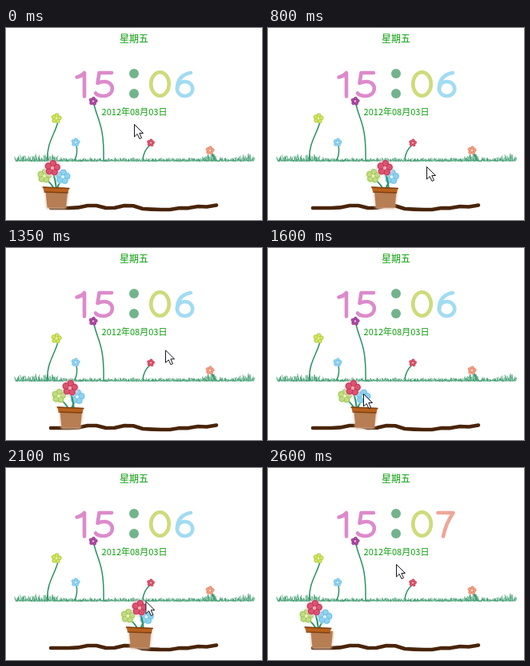
Write an HTML page that moves like this. It is 320 px wide and 240 px high and loops after 2.75 s.

```html
<!DOCTYPE html>
<html lang="zh">
<head>
<meta charset="utf-8">
<style>
html, body { margin: 0; width: 100%; height: 100%; overflow: hidden; background: #fff; }
svg { display: block; width: 100vw; height: 100vh; }
text { font-family: "Noto Sans CJK SC", "Noto Sans CJK", sans-serif; fill: #0a9e0a; text-anchor: middle; }
.line { fill: none; stroke-linecap: round; stroke-linejoin: round; }
</style>
</head>
<body>
<svg viewBox="0 0 320 240">
  <defs>
    <filter id="soft" x="-50%" y="-50%" width="200%" height="200%"><feGaussianBlur stdDeviation="1.6"/></filter>
  </defs>
  <rect width="320" height="240" fill="#fff"/>
  <text x="160" y="18" font-size="12">星期五</text>
  <text x="160.5" y="108.5" font-size="11">2012年08月03日</text>

  <g class="line" stroke-width="4.6">
    <path stroke="#dc8acb" d="M88.5 61.5Q95 60 98 56V85.5"/>
    <path stroke="#dc8acb" d="M132 56H116.5L114.5 69Q119 67 123 67C136.5 67 136 85 122 85Q115 85 112 81.5"/>
    <ellipse stroke="#cedb7b" cx="192.5" cy="70" rx="11.3" ry="14.8"/>
    <g id="six" stroke="#a1dcf2"><path d="M231 56Q214 59 214 76"/><ellipse cx="223.6" cy="76" rx="9.7" ry="9"/></g>
    <path id="seven" stroke="#eda798" d="M212.5 56H231.5Q222 70 219 85.5"/>
  </g>
  <g fill="#73b38c"><circle cx="160" cy="57" r="6"/><circle cx="160" cy="82" r="6"/></g>

  <g class="line" stroke="#2c9160">
    <path id="grass" stroke-width=".7"/>
    <g stroke-width="1.5">
      <path d="M65 117C62 131 50 145 52 165"/>
      <path d="M88 147Q90 156 86 165"/>
      <path d="M110 95C114 115 123 120 122 165"/>
      <path d="M180 146Q172 154 171 164"/>
      <path d="M256 156Q260 160 260 165"/>
    </g>
  </g>
  <g id="meadow"></g>
  <path id="soil" class="line" stroke="#492409" stroke-width="4.6"/>

  <g id="pot">
    <g id="sides" class="line" stroke="#2c9160" stroke-width="2">
      <path d="M-13 189Q-6 193-2 201M9 190Q3 195 2 201"/>
    </g>
    <g id="top">
      <path class="line" stroke="#2c9160" stroke-width="2" d="M-3 181Q0 191 1 201"/>
    </g>
    <g id="body">
      <path d="M-13 204H16L13 226H-11Z" fill="#d9b79c" filter="url(#soft)"/>
      <path d="M-12.5 204H15L13 224.5H-10.5Z" fill="#b77d53"/>
    </g>
    <path d="M-16 198.5L17 200L15.5 206L-14.5 204.5Z" fill="#b9621d"/>
    <path class="line" d="M-16 199L17 200.5M-14 205L15 206" stroke="#80400f" stroke-width="1.3"/>
  </g>
  <path id="cursor" d="M.5.5V16L4.2 12.5L7 18.5L9.5 17.3L6.8 11.5H11.5Z" fill="#fff" stroke="#15151f"/>
</svg>
<script>
const $ = id => document.getElementById(id);
const LOOP = 2750, STEP = 50;

let seed = 17;
function rnd() {
  seed = (seed * 16807) % 2147483647;
  return seed / 2147483647;
}

function flower(x, y, r, petal, edge, heart) {
  let s = "";
  for (let i = 0; i < 5; i++) {
    const a = 0.15 + (i * 0.4 - 0.5) * Math.PI;
    const px = x + r * 0.62 * Math.cos(a), py = y + r * 0.62 * Math.sin(a);
    s += `<circle cx="${px}" cy="${py}" r="${r * 0.4}" fill="${petal}" stroke="${edge}" stroke-width="${r * 0.13}"/>`;
  }
  return s + `<circle cx="${x}" cy="${y}" r="${r * 0.24}" fill="${heart}" stroke="none"/>`;
}

function glowing(x, y, r, glow, ...colors) {
  return `<circle cx="${x}" cy="${y}" r="${r + 0.7}" fill="${glow}" stroke="none" filter="url(#soft)"/>` +
    flower(x, y, r, ...colors);
}

function grass() {
  const tuft = (x, c, w) => Math.exp(-(((x - c) / w) ** 2));
  let d = "M12 166H309";
  for (let x = 12; x < 310; x += 0.8) {
    const tall = 2.5 + 6 * tuft(x, 49, 15) + 3 * tuft(x, 22, 9) + 5 * tuft(x, 255, 11) + 5 * tuft(x, 299, 9);
    d += `M${x} ${165 + rnd() * 2}l${(rnd() - 0.5) * 4} ${-tall * (0.25 + rnd())}`;
  }
  return d;
}

function soil() {
  const heights = [225, 225, 222, 225, 222, 226, 227, 225, 223, 221.5];
  return "M" + heights.map((y, i) => `${56 + i * 23} ${y}l11 ${rnd() * 2 - 1}`).join("L").replace(/l11 \S+$/, "");
}

$("grass").setAttribute("d", grass());
$("soil").setAttribute("d", soil());
$("meadow").innerHTML =
  flower(63, 113, 6.2, "#d2e65c", "#a5c436", "#f4f4a0") +
  flower(87, 143, 5.2, "#8fd4f2", "#67b9e4", "#e0f5ff") +
  flower(109, 91.5, 5.2, "#b04aa5", "#872b84", "#eab0dd") +
  flower(181, 143.5, 4.6, "#e25468", "#bb3150", "#f6c0c4") +
  flower(255, 153, 5.2, "#f2a184", "#dd7a60", "#fce0d0");
$("sides").innerHTML +=
  glowing(-14, 185, 8.2, "#e3efc6", "#c3dc84", "#9fc75d", "#f3f3b4") +
  glowing(9, 186, 8.6, "#d8effa", "#8fd3ef", "#6fc0e6", "#dff4fc");
$("top").innerHTML += glowing(-4, 175, 9.2, "#f3ccd4", "#dc5470", "#c23a5c", "#f4a9b4");

// time, x
const potKeys = [
  [500, 62], [700, 104], [800, 145.5], [950, 208], [1100, 217], [1200, 180], [1300, 62],
  [1350, 80], [1500, 212], [1600, 120], [1700, 64], [1750, 62], [1850, 82.5], [1950, 62],
  [2200, 236], [2300, 253], [2450, 271], [2600, 62]
];

// time, x, y
const tipKeys = [
  [250, 160, 120], [600, 185, 168], [800, 198, 173], [1050, 217, 168], [1200, 184, 122],
  [1300, 192, 105], [1450, 213, 172], [1600, 119, 182], [1700, 76, 180], [1850, 114, 176],
  [1950, 122, 144], [2050, 155, 166], [2300, 252, 167], [2450, 272, 150], [2600, 160, 120]
];

function at(keys, t) {
  let i = 1;
  while (i < keys.length - 1 && keys[i][0] <= t) i++;
  const a = keys[i - 1], b = keys[i];
  const k = Math.min(1, Math.max(0, (t - a[0]) / (b[0] - a[0])));
  return a.slice(1).map((v, n) => v + (b[n + 1] - v) * k);
}

const move = (id, x, y = 0) => $(id).setAttribute("transform", `translate(${x} ${y})`);

function draw(ms) {
  const t = Math.floor((ms % LOOP) / STEP) * STEP;
  const [x] = at(potKeys, t), [tx, ty] = at(tipKeys, t);
  const speed = x - at(potKeys, t - STEP)[0];
  const homing = speed < 0 && ty < 152;
  // blooms lead a dragged pot, the body trails one running home
  const lean = homing ? 0 : Math.max(-10, Math.min(4.5, speed * 0.22));
  move("pot", x);
  move("sides", Math.min(0, lean));
  move("top", lean);
  move("body", homing ? 4 : 0);
  move("cursor", tx, ty);
  const late = t >= 2550;
  $("six").style.display = late ? "none" : "";
  $("seven").style.display = late ? "" : "none";
}

const start = performance.now();
function tick() {
  draw(performance.now() - start);
  requestAnimationFrame(tick);
}
tick();
</script>
</body>
</html>
```
